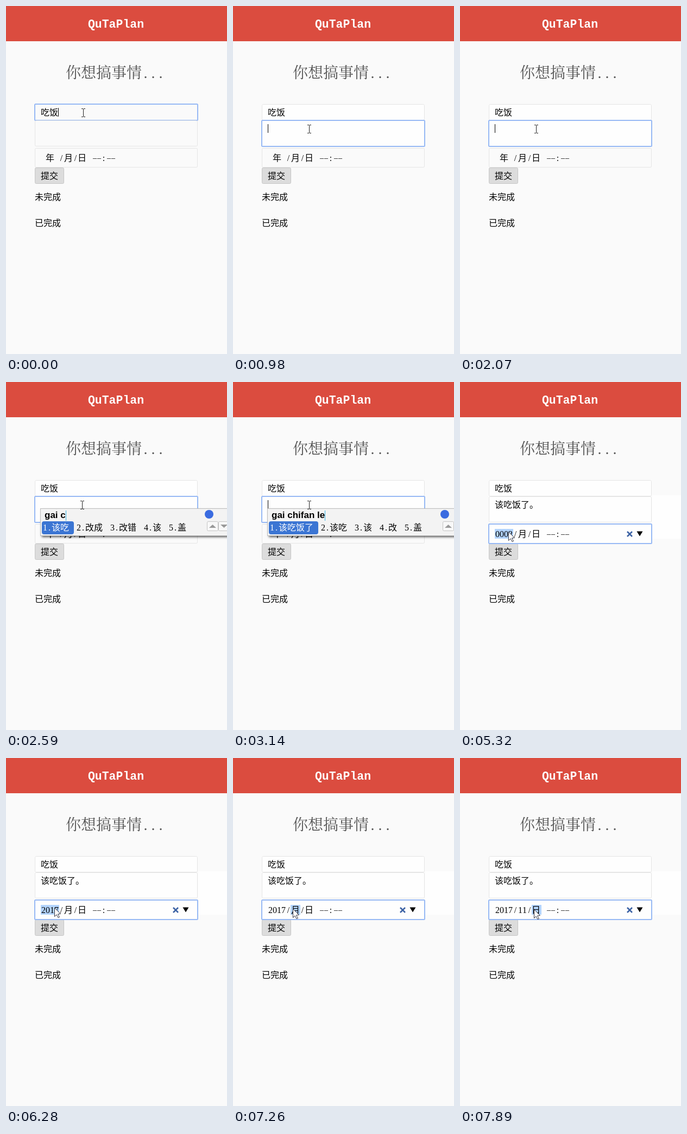
An HTML page with a canvas that plays this animation: 407x642 px, repeating every 8000 ms.

```html
<!DOCTYPE html>
<html lang="zh">
<head>
<meta charset="utf-8">
<style>
html, body { margin: 0; width: 100%; height: 100%; overflow: hidden; background: #fafafa; }
canvas { display: block; }
</style>
</head>
<body>
<canvas id="stage" width="407" height="642"></canvas>
<script>
const c = document.getElementById('stage').getContext('2d');
const LOOP = 8000;
const SERIF = '"Noto Serif CJK SC", "Noto Sans CJK SC", "Noto Sans CJK", serif';
const SANS = '"Noto Sans CJK SC", "Noto Sans CJK", sans-serif';
const LATIN = '"Liberation Serif", serif';

// Each track lists [start time, value]; a value holds until the next start.
const caretTrack = [[0, [96, 188]], [400, null], [980, [64, 218]], [1540, null], [2070, [64, 218]],
  [2590, null], [3140, [64, 218]], [3290, [128, 218]], [3440, [144, 218]], [3970, null],
  [4240, [144, 218]], [4360, null]];
const pointerTrack = [[0, [142, 197]], [710, [141, 213]], [830, [140, 227]], [4120, [102, 282]],
  [4240, [96, 280]], [4360, [89, 276]], [6990, [102, 278]], [7110, [110, 278]],
  [7620, [122, 278]], [7740, [130, 277]], [7890, [136, 279]]];
const focusTrack = [[0, 'title'], [980, 'note'], [4360, 'date']];
const noteTrack = [[0, ''], [3290, '该吃饭了'], [3440, '该吃饭了。']];
const imeTrack = [[0, null],
  [2320, ['g', '个', '给', '过', '高', '该']],
  [2590, ['gai c', '该吃', '改成', '改错', '该', '盖']],
  [2740, ['gai chi', '该吃', '改吃', '该', '改', '盖']],
  [2860, ['gai chifan', '该吃饭', '该吃', '该', '改', '盖']],
  [3140, ['gai chifan le', '该吃饭了', '该吃', '该', '改', '盖']],
  [3290, null]];
const yearTrack = [[0, ''], [5320, '0002'], [5600, '0020'], [5880, '0201'], [6280, '2017']];
const monthTrack = [[0, '月'], [7380, '01'], [7500, '11']];
const markTrack = [[0, null], [4360, [64, 34]], [7260, [106, 18]], [7500, [132, 18]]];
const HOVER = 4120; // the pointer reaches the date field

const at = (track, t) => track.filter(k => k[0] <= t).pop()[1];

function rect(color, x, y, w, h) {
  c.fillStyle = color;
  c.fillRect(x, y, w, h);
}

function round(x, y, w, h, r, fill, stroke, line = 1) {
  c.beginPath();
  c.roundRect(x, y, w, h, r);
  if (fill) { c.fillStyle = fill; c.fill(); }
  if (stroke) { c.strokeStyle = stroke; c.lineWidth = line; c.stroke(); }
}

function poly(points, fill, stroke) {
  c.beginPath();
  points.forEach(p => c.lineTo(...p));
  c.closePath();
  c.fillStyle = fill;
  c.fill();
  if (stroke) { c.strokeStyle = stroke; c.lineWidth = 1; c.stroke(); }
}

// Full-width and half-width characters on a fixed grid.
function text(str, x, y, { size = 16, color = '#000', weight = 400, family = SANS } = {}) {
  c.fillStyle = color;
  c.textAlign = 'center';
  for (const ch of str) {
    const half = ch < '\u3000', w = half ? size / 2 : size;
    c.font = `${weight} ${size}px ${half ? LATIN : family}`;
    c.fillText(ch, x + w / 2, y);
    x += w;
  }
  return x;
}

function field(x, y, w, h, focused) {
  if (focused) round(x, y, w, h, 1.5, null, '#97b9f4', 2);
  else round(x + .5, y + .5, w - 1, h - 1, 2, null, '#e5e5e5');
}

function page() {
  rect('#fafafa', 0, 0, 407, 642);
  rect('#db4c3f', 0, 0, 407, 65);
  c.textAlign = 'center';
  c.font = 'bold 21.5px "Liberation Mono", monospace';
  c.fillStyle = '#fff';
  c.fillText('QuTaPlan', 202.5, 40);
  text('你想搞事情...', 110, 133, { size: 28, color: '#555', weight: 500, family: SERIF });
  round(53.5, 298.5, 53, 29, 2, '#dcdcdc', '#c6c6c6');
  text('提交', 64, 319);
  text('未完成', 53, 358);
  text('已完成', 53, 406);
}

function form(t) {
  const focus = at(focusTrack, t), year = at(yearTrack, t), mark = at(markTrack, t);
  if (t >= 980) rect('#fefefe', 53, 181, 300, 79);
  if (t >= 3290) rect('#fefefe', 354, 209, 53, 80);
  if (t >= HOVER) rect('#fefefe', 53, 262, 300, 36);
  field(53, 181, 300, 30, focus === 'title');
  field(53, 262, 300, 36, focus === 'date');
  field(53, 211, 300, 48, focus === 'note');
  text('吃饭', 64, 202);
  text(at(noteTrack, t), 64, 232);

  if (mark) rect('#b3d4fd', mark[0], 271, mark[1], 18);
  text(year || '年', year ? 65 : 73, 286);
  text('/', 98, 286);
  text(at(monthTrack, t), 107, 286);
  text('/', 124, 286);
  text('日', 132, 286);
  for (const x of [160, 168, 186, 194]) text('–', x, 285, { size: 14 });
  text(':', 176, 286);
  if (t >= HOVER) poly([[325.5, 275.5], [336.5, 275.5], [331, 284.5]], '#000');
  if (year) {
    c.strokeStyle = '#3c62a4';
    c.lineWidth = 2.6;
    c.beginPath();
    c.moveTo(308, 276); c.lineTo(317, 285);
    c.moveTo(317, 276); c.lineTo(308, 285);
    c.stroke();
  }
  const caret = at(caretTrack, t);
  if (caret) rect('#000', ...caret, 1, 16);
}

function scrollButton(x, dir) {
  round(x + .5, 257.5, 20, 17, 2, '#f8f8f8', '#c4c4c4');
  poly([[x + 4, 266 + 3 * dir], [x + 10.5, 266 - 3 * dir], [x + 17, 266 + 3 * dir]], '#999');
}

function ime([typed, ...words]) {
  const end = words.reduce((x, w) => x + 30 + 16 * w.length, 54);
  c.save();
  c.shadowColor = 'rgba(0,0,0,.65)';
  c.shadowBlur = 4;
  c.shadowOffsetX = c.shadowOffsetY = 2;
  rect('#f3f3f3', 64, 234, end + 20, 50);
  c.restore();
  c.strokeStyle = '#bbb';
  c.lineWidth = 1;
  c.strokeRect(63.5, 233.5, end + 20, 50);

  c.font = 'bold 17px "Liberation Sans", Arial, sans-serif';
  c.textAlign = 'left';
  c.fillStyle = '#000';
  c.fillText(typed, 71, 251);
  rect('#35b5e8', 71 + Math.round(c.measureText(typed).width), 237, 1, 19);

  let x = 68;
  words.forEach((word, i) => {
    if (!i) round(66, 257, 27 + 16 * word.length, 24, 4, '#3b75d3');
    x = text(`${i + 1}.${word}`, x, 274, { color: i ? '#000' : '#fff' }) + 14;
  });

  c.beginPath();
  c.arc(end + 42, 244, 8, 0, 7);
  c.fillStyle = '#3a6be0';
  c.fill();
  scrollButton(end + 38, 1);
  scrollButton(end + 59, -1);
}

function pointer(t) {
  const [x, y] = at(pointerTrack, t);
  if (t < HOVER) {
    rect('#222', x, y - 7, 1, 14);
    for (const dy of [-8, 7]) {
      rect('#222', x - 3, y + dy, 3, 1);
      rect('#222', x + 1, y + dy, 3, 1);
    }
    return;
  }
  c.save();
  c.translate(x + .5, y + .5);
  poly([[0, 0], [0, 16], [3.5, 12.5], [6.5, 18], [9, 17], [6, 11.5], [11, 11]], '#fff', '#33333f');
  c.restore();
}

function draw(now) {
  const t = now % LOOP, words = at(imeTrack, t);
  page();
  form(t);
  if (words) ime(words);
  pointer(t);
}

const start = performance.now();
function tick() {
  draw(performance.now() - start);
  requestAnimationFrame(tick);
}
tick();
</script>
</body>
</html>
```
